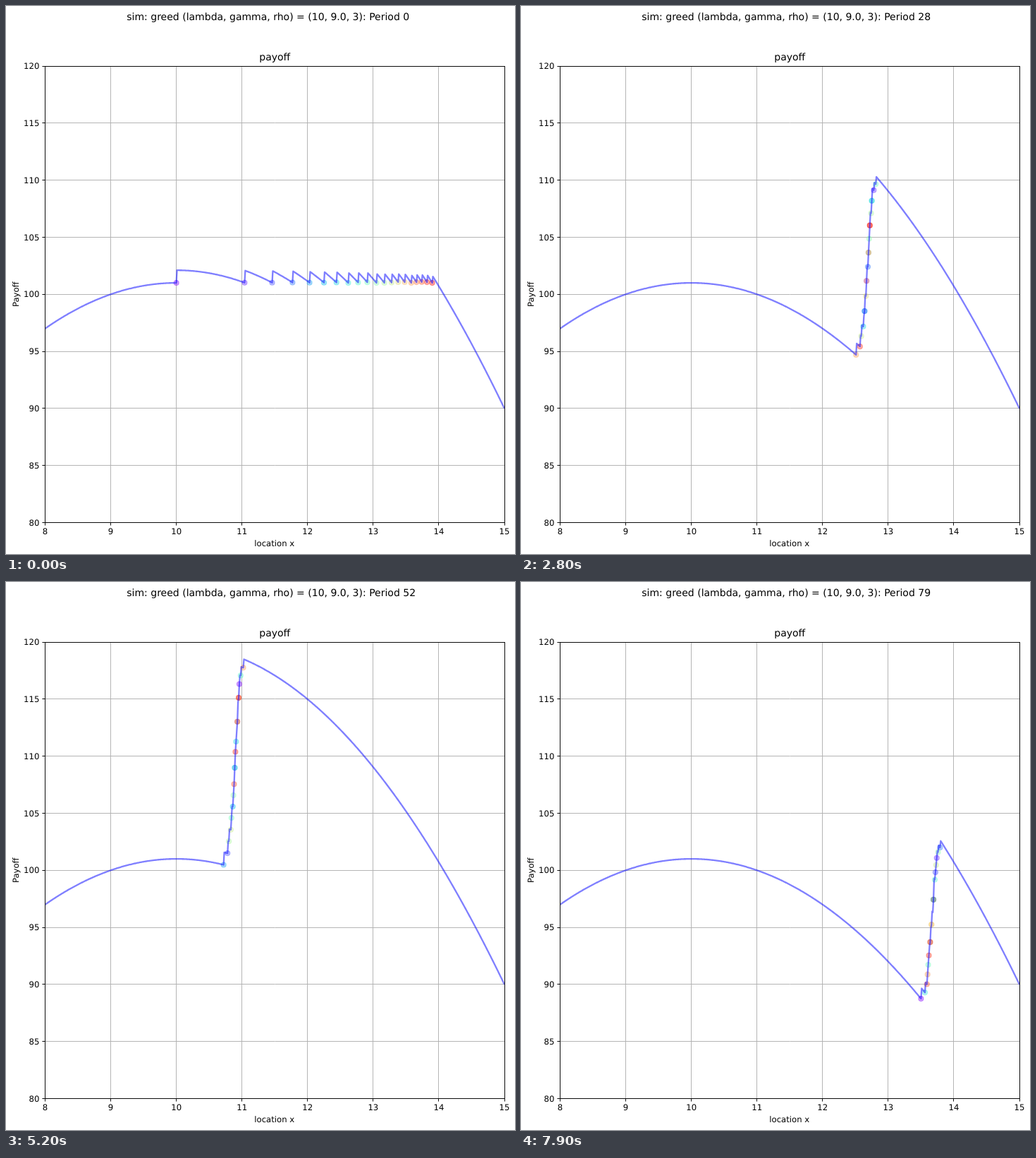
Recreate the animation shown at these times as an HTML page with a canvas. Size 722 by 776 pixels, loop 8 s.

```html
<!DOCTYPE html>
<html lang="en">
<head>
<meta charset="utf-8">
<title>payoff</title>
<style>
html, body { margin: 0; width: 100%; height: 100%; overflow: hidden; background: #fff; }
canvas { display: block; }
</style>
</head>
<body>
<canvas id="stage" width="722" height="776"></canvas>
<script>
const ctx = document.getElementById('stage').getContext('2d');
const LEFT = 55.5, TOP = 85, WIDTH = 651.5, HEIGHT = 646.5;
const AGENTS = 20, PERIODS = 80, PERIOD_MS = 100, DAMPING = 0.01013;
const FONT = '"DejaVu Sans", Verdana, sans-serif';
const px = x => LEFT + (x - 8) / 7 * WIDTH;
const py = y => TOP + (120 - y) / 40 * HEIGHT;
const snap = v => Math.floor(v) + 0.5;

// Places are counted in hundredths to the right of x = 10.
// [period, place] of the cluster's leader: steady climbs, with a fall back to 10.
const FRONT = [[1, 10], [13, 118], [28, 281], [40, 392], [41, 3], [52, 102], [65, 229], [79, 379]];

function random(seed) {
  return () => {
    seed = seed + 0x6D2B79F5 | 0;
    let t = Math.imul(seed ^ seed >>> 15, 1 | seed);
    t = t + Math.imul(t ^ t >>> 7, 61 | t) ^ t;
    return ((t ^ t >>> 14) >>> 0) / 4294967296;
  };
}

const rankGain = r => 1.117 * r - 0.00898 * r * r;

// At the start all agents earn about the same.
const initial = Array.from({ length: AGENTS }, (_, i) => {
  const g = rankGain(i);
  return Math.floor(100 * Math.sqrt(g / (1 + DAMPING * g)));
});

function frontAt(p) {
  const k = FRONT.findIndex(([q]) => q >= p);
  const [q, b] = FRONT[k];
  if (q === p) return b;
  const [o, a] = FRONT[k - 1];
  return a + (b - a) * (p - o) / (q - o);
}

// Distance behind the leader: dense in the middle, with a longer tail at the back.
function lag(i, rnd) {
  const u = (i + 0.5) / AGENTS, z = Math.log(u / (1 - u));
  return i ? 11.5 + z * (z < 0 ? 3.2 : 4.8) + 2 * rnd() - 1 : 0;
}

function shuffle(list, rnd) {
  for (let i = list.length - 1; i > 0; i--) {
    const j = Math.floor(rnd() * (i + 1));
    [list[i], list[j]] = [list[j], list[i]];
  }
  return list;
}

function places(p) {
  if (p === 0) return initial;
  const front = frontAt(p), rnd = random(p * 977);
  const now = shuffle(initial.map((_, i) => Math.max(0, Math.round(front - lag(i, rnd)))), rnd);
  // About half of those left behind join the new cluster each period.
  const reset = p < 41 ? 1 : 41;
  if (p > reset + 4) return now;
  const old = places(reset - 1), wait = random(reset);
  return now.map((v, i) => p < reset + Math.floor(-Math.log2(wait() + 1e-9)) ? old[i] : v);
}

function payoff(c, row) {
  let below = 0, same = 0;
  for (const v of row) {
    if (v < c) below++;
    else if (v === c) same++;
  }
  const d2 = (c / 100) ** 2;
  return 101 - d2 + rankGain(below + Math.max(0, same - 1) / 2) * (1 - DAMPING * d2);
}

function rainbow(t) {
  const [r, g, b] = [Math.abs(2 * t - 0.5), Math.sin(Math.PI * t), Math.cos(Math.PI * t / 2)]
    .map(v => Math.round(255 * Math.min(1, v)));
  return `rgba(${r},${g},${b},0.37)`;
}

function text(s, x, y, size, align) {
  ctx.font = `${size}px ${FONT}`;
  ctx.textRendering = 'geometricPrecision';
  ctx.textAlign = align;
  ctx.fillStyle = '#000';
  ctx.fillText(s, x, y);
}

function line(x1, y1, x2, y2, color) {
  ctx.strokeStyle = color;
  ctx.beginPath();
  ctx.moveTo(x1, y1);
  ctx.lineTo(x2, y2);
  ctx.stroke();
}

function drawAxes() {
  const left = snap(LEFT), right = snap(LEFT + WIDTH);
  const top = snap(TOP), bottom = snap(TOP + HEIGHT);
  ctx.lineWidth = 0.93;
  for (let x = 8; x <= 15; x++) {
    const gx = snap(px(x));
    line(gx, top, gx, bottom, '#b0b0b0');
    line(gx, bottom, gx, bottom + 4.1, '#000');
    text(x, px(x), 748, 11.67, 'center');
  }
  for (let y = 80; y <= 120; y += 5) {
    const gy = snap(py(y));
    line(left, gy, right, gy, '#b0b0b0');
    line(left - 4.1, gy, left, gy, '#000');
    text(y, 47.3, Math.round(py(y) + 4.2), 11.67, 'right');
  }
  text('payoff', px(11.5), 77, 14, 'center');
  text('location x', px(11.5) - 0.5, 765, 11.67, 'center');
  ctx.save();
  ctx.translate(18, py(100));
  ctx.rotate(-Math.PI / 2);
  text('Payoff', 0, 0, 11.67, 'center');
  ctx.restore();
}

function drawFrame() {
  ctx.lineWidth = 0.93;
  ctx.strokeStyle = '#000';
  const x = snap(LEFT), y = snap(TOP);
  ctx.strokeRect(x, y, snap(LEFT + WIDTH) - x, snap(TOP + HEIGHT) - y);
}

function drawCurve(row) {
  ctx.beginPath();
  for (let c = -200; c <= 500; c++) ctx.lineTo(px(10 + c / 100), py(payoff(c, row)));
  ctx.lineWidth = 2.33;
  ctx.lineJoin = 'round';
  ctx.strokeStyle = 'rgba(0,0,255,0.5)';
  ctx.stroke();
}

function drawAgents(row) {
  ctx.lineWidth = 1.17;
  row.forEach((c, i) => {
    ctx.fillStyle = ctx.strokeStyle = rainbow(i / (AGENTS - 1));
    ctx.beginPath();
    ctx.arc(px(10 + c / 100), py(payoff(c, row)), 3.5, 0, 2 * Math.PI);
    ctx.fill();
    ctx.stroke();
  });
}

function draw(p) {
  const row = places(p);
  ctx.fillStyle = '#fff';
  ctx.fillRect(0, 0, 722, 776);
  drawAxes();
  ctx.save();
  ctx.beginPath();
  ctx.rect(LEFT, TOP, WIDTH, HEIGHT);
  ctx.clip();
  drawAgents(row);
  drawCurve(row);
  ctx.restore();
  drawFrame();
  text(`sim: greed (lambda, gamma, rho) = (10, 9.0, 3): Period ${p}`, 171.3, 20, 14, 'left');
}

let start, shown = -1;
function tick(now) {
  start ??= now;
  const p = Math.floor((now - start) / PERIOD_MS) % PERIODS;
  if (p !== shown) draw(shown = p);
  requestAnimationFrame(tick);
}
requestAnimationFrame(tick);
</script>
</body>
</html>
```
